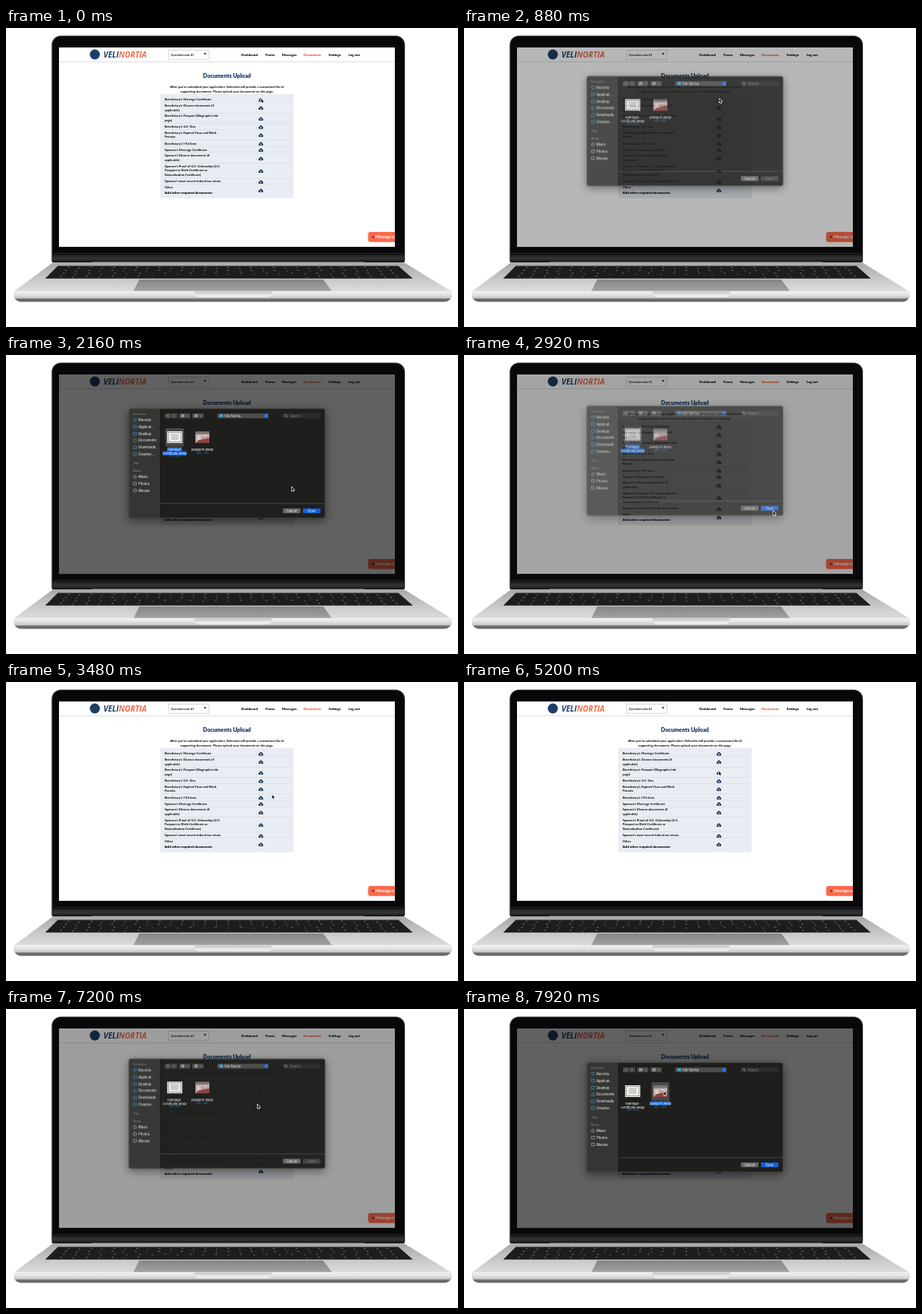
An HTML page with a canvas that plays this animation: 580 by 384 pixels, repeating every 8000 ms.

```html
<!DOCTYPE html>
<html lang="en">
<head>
<meta charset="utf-8">
<title>Documents Upload</title>
<style>
  html, body { margin: 0; width: 100%; height: 100%; overflow: hidden; background: #fff; }
  canvas { display: block; width: 580px; height: 384px; }
</style>
</head>
<body>
<canvas id="stage"></canvas>
<script>
const W = 580, H = 384, LOOP = 8000;
const K = window.devicePixelRatio || 1;
const PAGE = 'Lato, "Open Sans", sans-serif';
const UI = 'Inter, Roboto, sans-serif';
const NAVY = '#0d3263', ORANGE = '#f26a44', BLUE = '#1260d6';
const SCREEN = [68, 25, 431, 256.3];

function layer(canvas) {
  canvas.width = W * K;
  canvas.height = H * K;
  const c = canvas.getContext('2d');
  c.scale(K, K);
  return c;
}
const main = layer(document.getElementById('stage'));
const back = layer(document.createElement('canvas'));
const sheet = layer(document.createElement('canvas'));
let g = main;

const clamp = v => Math.max(0, Math.min(1, v));
const smooth = p => p * p * (3 - 2 * p);
const easeOut = p => 1 - (1 - p) ** 3;

function rect(x, y, w, h, fill, r = 0) {
  g.fillStyle = fill;
  g.beginPath();
  g.roundRect(x, y, w, h, r);
  g.fill();
}
function poly(fill, ...pts) {
  g.fillStyle = fill;
  g.beginPath();
  for (let i = 0; i < pts.length; i += 2) g.lineTo(pts[i], pts[i + 1]);
  g.closePath();
  g.fill();
}
function line(color, width, ...pts) {
  g.strokeStyle = color;
  g.lineWidth = width;
  g.beginPath();
  for (let i = 0; i < pts.length; i += 2) g.lineTo(pts[i], pts[i + 1]);
  g.stroke();
}
function disc(x, y, r, fill) {
  g.fillStyle = fill;
  g.beginPath();
  g.arc(x, y, r, 0, Math.PI * 2);
  g.fill();
}
function text(str, x, y, font, color, align = 'left') {
  g.font = font;
  g.fillStyle = color;
  g.textAlign = align;
  g.fillText(str, x, y);
}
function ramp(y0, y1, ...colors) {
  const f = g.createLinearGradient(0, y0, 0, y1);
  colors.forEach((c, i) => f.addColorStop(i / (colors.length - 1), c));
  return f;
}

function keyboard() {
  const left = y => 66 - (y - 306), right = y => 504 + (y - 306) * 1.15;
  const at = (y, f) => left(y) + (right(y) - left(y)) * f;
  poly('#1d1d1d', left(305.5), 305.5, right(305.5), 305.5, right(321.7), 321.7, left(321.7), 321.7);
  for (let row = 0; row < 4; row++) {
    const y = 306.2 + row * 3.9, n = row > 1 ? 14 : 15;
    for (let i = 0; i < n; i++) {
      if (row === 3 && i > 3 && i < 10) continue;
      rect(at(y, (i + 0.5) / n) - 1.2, y + 0.6, 2.4, 0.8, '#8a8a8a');
      if (i) line('#707070', 0.9, at(y, i / n), y + 1.2, at(y + 3, i / n), y + 3);
    }
  }
}

function laptop() {
  rect(0, 0, W, H, '#fff');
  rect(58.5, 9.7, 453.5, 291.5, '#3c3e40', [12, 12, 3, 3]);
  rect(59.6, 10.8, 451.3, 290, '#08080a', [11, 11, 2, 2]);
  rect(61, 289.3, 449, 0.8, '#333435');
  rect(59.5, 291, 451.5, 10, ramp(291, 301, '#1b1c1d', '#343536', '#131314'), 1);
  rect(110, 300.2, 350, 1, '#77797a');
  poly(ramp(301, 339, '#a6a7a8', '#c4c5c6', '#dcdddd'), 60, 301.2, 511, 301.2, 572, 338.5, 10, 338.5);
  keyboard();
  poly(ramp(323, 339, '#858687', '#a2a3a4'), 171, 323, 407, 323, 419, 339, 163, 339);
  rect(10, 338, 562, 13.7, ramp(346, 352, '#bdbebe', '#606162', '#77787a'), [1, 1, 9, 9]);
  rect(10, 337.7, 562, 9.3, ramp(338, 347, '#f1f1f1', '#e2e3e3', '#c4c5c5'), [1, 1, 4, 4]);
  rect(242, 338.5, 99, 7, ramp(338, 346, '#b9baba', '#e3e3e3', '#f7f7f7'), [0, 0, 5, 5]);
}

// first baseline, icon centre, lines of the label
const ROWS = [
  [93, 92.5, "Beneficiary's Marriage Certificate"],
  [101, 103, "Beneficiary's Divorce documents (if", 'applicable)'],
  [114.3, 117, "Beneficiary's Passport (Biographic info", 'page)'],
  [128, 127.5, "Beneficiary's U.S. Visa"],
  [135.6, 138, "Beneficiary's Expired Visas and Work", 'Permits'],
  [149.6, 149, "Beneficiary's I-94 form"],
  [157.6, 157, "Sponsor's Marriage Certificate"],
  [165.2, 168, "Sponsor's Divorce documents (if", 'applicable)'],
  [178.7, 184, "Sponsor's Proof of U.S. Citizenship (U.S.", 'Passport or Birth Certificate or', 'Naturalization Certificate)'],
  [198.2, 198, "Sponsor's most recent federal tax return"],
  [206.2, 209, 'Other']
];
const NAV = [[302, 'Dashboard'], [333, 'Forms'], [354, 'Messages'], [382, 'Documents'], [414, 'Settings'], [439.5, 'Log out']];

function cloud(x, y) {
  disc(x - 1.4, y + 0.6, 1.5, NAVY);
  disc(x + 0.1, y - 0.5, 1.9, NAVY);
  disc(x + 1.7, y + 0.7, 1.4, NAVY);
  rect(x - 1.5, y + 0.2, 3.2, 1.9, NAVY);
  poly('#fff', x, y - 0.9, x + 1.1, y + 0.4, x + 0.4, y + 0.4, x + 0.4, y + 1.4,
    x - 0.4, y + 1.4, x - 0.4, y + 0.4, x - 1.1, y + 0.4);
}

function page(uploaded) {
  rect(...SCREEN, '#fff');
  rect(68, 43, 431, 0.8, '#d5d5d5');
  disc(114, 34, 6.5, '#1d3f66');
  const brand = 'italic bold 10px "Open Sans", "Noto Sans", sans-serif';
  text('VELI', 125, 37.7, brand, '#1d3f66');
  text('NORTIA', 125 + g.measureText('VELI').width, 37.7, brand, ORANGE);

  g.strokeStyle = '#c4c4c4';
  g.lineWidth = 0.6;
  g.strokeRect(208.5, 28.5, 52, 11.7);
  text('Questionnaire #1', 211.5, 36, `bold 3.9px ${PAGE}`, '#222');
  poly('#111', 253.7, 32.3, 257.3, 32.3, 255.5, 34.5);
  for (const [x, name] of NAV)
    text(name, x, 36, `900 4.3px ${PAGE}`, name === 'Documents' ? '#e8562f' : '#000');

  text('Documents Upload', 283.5, 64, `900 7.1px ${PAGE}`, NAVY, 'center');
  const note = `bold 4px ${PAGE}`;
  text("After you've submitted your application, Velinortia will provide a customized list of", 283.5, 76.7, note, '#000', 'center');
  text('supporting documents. Please upload your documents on this page.', 283.5, 83, note, '#000', 'center');

  rect(198, 84.7, 171, 134, '#e9ecf2');
  ROWS.forEach(([y, iy, ...lines], i) => {
    lines.forEach((s, n) => text(s, 203.5, y + n * 5.7, `bold 4.05px ${PAGE}`, '#000'));
    if (i < 10) rect(203, y + (lines.length - 1) * 5.7 + 2.2, 162, 0.5, '#d3d8e0');
    if (i === 0 && uploaded)
      text('marriage-certificate.webp', 315, 93.3, `bold 4px ${PAGE}`, '#e4472c');
    cloud(327, iy);
  });
  text('Add other required documents', 203.5, 212.5, `900 4.45px ${PAGE}`, '#000');

  g.save();
  g.shadowColor = 'rgba(249,106,76,.35)';
  g.shadowBlur = 2 * K;
  rect(464.7, 262, 40, 12.7, '#fb6a4b', 3);
  g.restore();
  disc(471, 268.3, 1.5, '#7d3a33');
  text('Message us', 474, 270.3, `bold 5.1px ${PAGE}`, '#fff');
}

const SIDE = [[83, 'Recents'], [92, 'Applicat...'], [101, 'Desktop'], [109.8, 'Documents'], [118.6, 'Downloads'],
  [127.4, 'Creative...'], [156.5, 'Music'], [165.2, 'Photos'], [174, 'Movies']];

function button(x, label, fill, color) {
  rect(x, 197, 22.5, 6.2, fill, 1.3);
  text(label, x + 11.2, 201.7, `4.2px ${UI}`, color, 'center');
}

function fileLabel(x, y, str, w, on) {
  if (on) rect(x - w / 2, y - 4.2, w, 5.5, BLUE, 1);
  text(str, x, y, `500 3.9px ${UI}`, '#eee', 'center');
}

function dialog(pick) {
  g.save();
  g.shadowColor = 'rgba(0,0,0,.5)';
  g.shadowBlur = 12 * K;
  g.shadowOffsetY = 3 * K;
  rect(157.7, 68.7, 251.8, 140.8, '#1e1e1c', 2.5);
  g.restore();
  rect(157.7, 68.7, 40.3, 140.8, '#353633', [2.5, 0, 0, 2.5]);
  rect(197.8, 68.7, 0.5, 140.8, '#0c0c0b');
  g.strokeStyle = '#5c5c5a';
  g.lineWidth = 0.5;
  g.beginPath();
  g.roundRect(157.9, 68.9, 251.4, 140.4, 2.5);
  g.stroke();

  const head = `3.5px ${UI}`;
  text('Favourites', 163, 77, head, '#8b8b88');
  text('Tags', 163, 140, head, '#8b8b88');
  text('Media', 163, 150, head, '#8b8b88');
  SIDE.forEach(([y, name], i) => {
    g.strokeStyle = i < 6 ? '#3f97d8' : '#a9b5bb';
    g.lineWidth = 0.7;
    g.beginPath();
    if (i % 3) g.roundRect(163.6, y - 1.7, 3.8, 3.4, 0.5);
    else g.arc(165.5, y, 1.8, 0, Math.PI * 2);
    g.stroke();
    text(name, 170, y + 1.6, `500 4.2px ${UI}`, '#e4e4e2');
  });

  for (const x of [204, 212, 222, 239])
    rect(x, 75, x < 220 ? 7.6 : 14.5, 6.2, '#4c4c4a', 1.2);
  line('#bbb', 0.6, 208.4, 76.7, 207, 78.1, 208.4, 79.5);
  line('#888', 0.6, 215, 76.7, 216.4, 78.1, 215, 79.5);
  for (const x of [225, 242])
    for (let i = 0; i < 4; i++) rect(x + (i % 2) * 2.1, 76.3 + (i >> 1) * 2, 1.5, 1.5, '#ccc');
  for (const x of [233, 250]) line('#ccc', 0.5, x - 0.9, 77.7, x, 78.7, x + 0.9, 77.7);
  rect(271, 75, 66, 6.2, '#4c4c4a', 1.2);
  rect(274, 76.3, 4.4, 3.5, '#37aee6', 0.5);
  text('Veli Nortia', 280, 79.7, `4.3px ${UI}`, '#eee');
  disc(333.7, 78.1, 2.7, BLUE);
  line('#fff', 0.5, 332.8, 77.5, 333.7, 76.6, 334.6, 77.5);
  line('#fff', 0.5, 332.8, 78.7, 333.7, 79.6, 334.6, 78.7);
  rect(355, 75, 48.5, 6.2, '#2c2c2a', 1.2);
  g.strokeStyle = '#bbb';
  g.beginPath();
  g.arc(359, 77.7, 1.5, 0, Math.PI * 2);
  g.stroke();
  line('#bbb', 0.6, 360, 78.8, 361.2, 80);
  text('Search', 364, 79.7, `4.2px ${UI}`, '#8a8a88');

  if (pick === 1) rect(204.5, 94, 24, 23.5, '#484846', 1.5);
  rect(206.8, 98, 19.4, 15, '#f3f3ee');
  g.strokeStyle = '#777';
  g.lineWidth = 0.7;
  g.strokeRect(208.3, 99.5, 16.4, 12);
  for (let i = 0; i < 4; i++) rect(211 + (i % 2), 101.8 + i * 2, 11 - (i % 2) * 2, 0.7, '#888');
  fileLabel(216.5, 122.5, 'marriage-', 19, pick === 1);
  fileLabel(216.5, 127.6, 'certificate.webp', 31, pick === 1);
  text('700 × 550', 216.5, 131.4, `3.1px ${UI}`, '#2f86dd', 'center');

  if (pick === 2) rect(240.5, 94, 23, 23.5, '#484846', 1.5);
  rect(243, 98.5, 18, 14.5, '#b8a6a3');
  rect(243, 98.5, 18, 3, '#77716f');
  poly('#8d4340', 243, 113, 248, 109, 261, 106.5, 261, 113);
  rect(245, 103, 5, 6, '#d9cbc5');
  rect(251.5, 103, 7, 1, '#e6dcd8');
  fileLabel(252, 122.5, 'passport.webp', 25.5, pick === 2);
  text('600 × 480', 252, 126.8, `3.1px ${UI}`, '#2f86dd', 'center');

  rect(198, 190.6, 211, 0.6, '#50504e');
  button(355.3, 'Cancel', '#686866', '#f0f0ee');
  button(381, 'Open', pick ? BLUE : '#40403e', pick ? '#fff' : '#848482');
}

// start, end, target x, target y, bulge x, bulge y, easing
const MOVES = [
  [950, 1600, 217, 104, 0, 0, smooth],
  [1640, 2400, 397, 201, 16.5, -12, smooth],
  [2920, 4080, 332.6, 136, 0, 0, easeOut],
  [4320, 5080, 327, 115, 0, 0, smooth],
  [6120, 6880, 328, 124, 0, 0, smooth],
  [7080, 7800, 256.5, 106, 0, 0, smooth]
];

function cursor(t) {
  let x = 327.5, y = 91;
  for (const [a, b, tx, ty, bx, by, ease] of MOVES) {
    const e = ease(clamp((t - a) / (b - a))), arc = 4 * e * (1 - e);
    x += (tx - x) * e + bx * arc;
    y += (ty - y) * e + by * arc;
  }
  g.save();
  g.translate(x, y);
  g.scale(0.85, 0.85);
  g.lineJoin = 'round';
  g.beginPath();
  for (const [px, py] of [[0, 0], [0, 5.4], [1.3, 4.3], [2.2, 6.2], [3.1, 5.8], [2.3, 3.9], [4, 3.8]]) g.lineTo(px, py);
  g.closePath();
  g.strokeStyle = '#fff';
  g.lineWidth = 1.6;
  g.stroke();
  g.fillStyle = '#000';
  g.fill();
  g.restore();
}

function opening(t, start) {
  const s = (t - start) / 40;
  const e = 1 - (1 - clamp(s / 20)) ** 2.7;
  return { dim: 0.62 * e, dy: -12.4 * (1 - e), alpha: 1 - (1 - clamp(s / 8)) ** 2.5 };
}
function closing(t, start) {
  const p = clamp((t - start) / 840);
  return { dim: 0.62 * (1 - p) ** 1.35, dy: -12.4 * p ** 1.2, alpha: 1 - p };
}
function sheetState(t) {
  if (t >= 6960) return opening(t, 6960);
  if (t >= 2640) return closing(t, 2640);
  return opening(t, 720);
}

g = back;
laptop();

function draw(t) {
  g = main;
  g.drawImage(back.canvas, 0, 0, W, H);
  g.save();
  g.beginPath();
  g.rect(...SCREEN);
  g.clip();
  page(t >= 5840);
  const { dim, dy, alpha } = sheetState(t);
  if (dim > 0) {
    rect(...SCREEN, `rgba(0,0,0,${dim})`);
    g = sheet;
    g.clearRect(0, 0, W, H);
    dialog(t >= 7840 ? 2 : t >= 1640 && t < 5000 ? 1 : 0);
    g = main;
    g.globalAlpha = alpha;
    g.drawImage(sheet.canvas, 0, dy, W, H);
    g.globalAlpha = 1;
  }
  cursor(t);
  g.restore();
}

const t0 = performance.now();
function tick() {
  draw((performance.now() - t0) % LOOP);
  requestAnimationFrame(tick);
}
tick();
</script>
</body>
</html>
```
